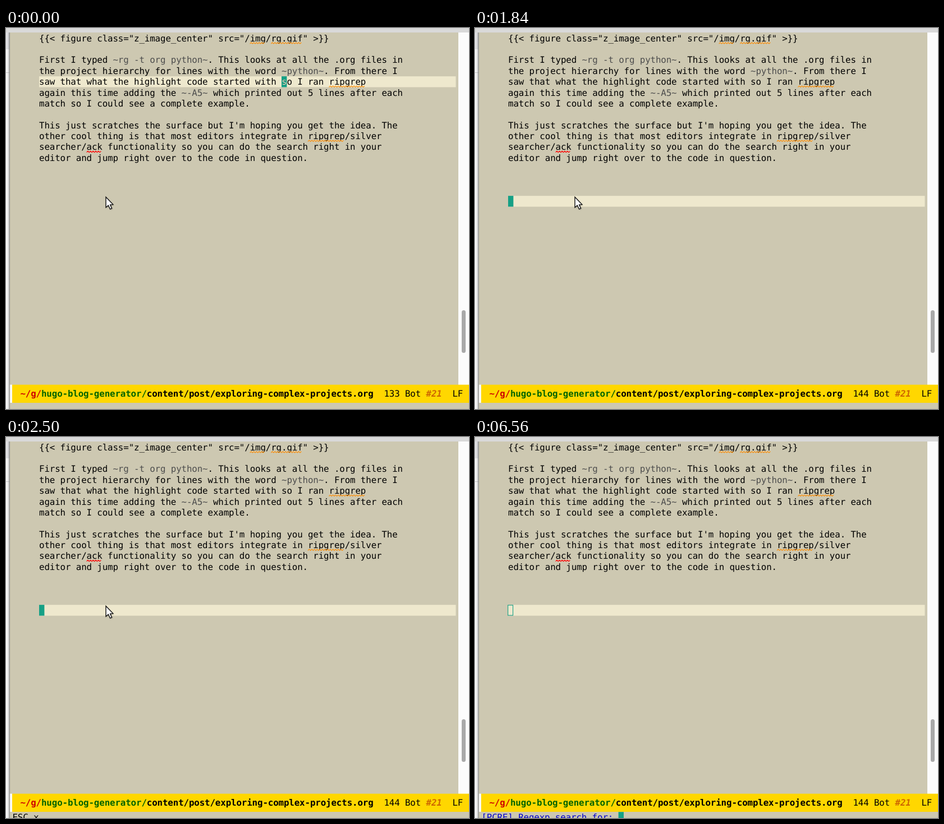
An HTML page with a canvas that plays this animation: 825x679 px, repeating every 8000 ms.

```html
<!DOCTYPE html>
<html lang="en">
<head>
<meta charset="utf-8">
<title>Editor search</title>
<style>
html, body { margin: 0; width: 100%; height: 100%; overflow: hidden; background: #cdc8b1; }
canvas { display: block; width: 825px; height: 679px; }
</style>
</head>
<body>
<canvas id="stage" width="825" height="679"></canvas>
<script>
const ctx = document.getElementById('stage').getContext('2d');
const LOOP = 8000;
const CELL = 9.391, ROW = 19.364, ASCENT = 15.1;
const LEFT = 59, TOP = 8.65;
const MODE_X = 25.4, MODE_BASE = 656.9;
const ECHO_X = 11.4, ECHO_TOP = 668.2;
const PAPER = '#cdc8b1', HIGHLIGHT = '#eee8cd', CURSOR = '#16a085';
const GRAY = '#4d4d4d', ORANGE = '#ff8c00', RED = '#ff0000';

// Text between tildes is verbatim markup and shown in gray.
const LINES = [
  '{{< figure class="z_image_center" src="/img/rg.gif" >}}',
  '',
  'First I typed ~rg -t org python~. This looks at all the .org files in',
  'the project hierarchy for lines with the word ~python~. From there I',
  'saw that what the highlight code started with so I ran ripgrep',
  'again this time adding the ~-A5~ which printed out 5 lines after each',
  'match so I could see a complete example.',
  '',
  "This just scratches the surface but I'm hoping you get the idea. The",
  'other cool thing is that most editors integrate in ripgrep/silver',
  'searcher/ack functionality so you can do the search right in your',
  'editor and jump right over to the code in question.'
];

const MISSPELLED = [
  [0, 'img', ORANGE], [0, 'rg.gif', ORANGE], [4, 'ripgrep', ORANGE],
  [9, 'ripgrep', ORANGE], [10, 'ack', RED]
];

const colX = col => LEFT + col * CELL;
const rowY = row => TOP + row * ROW;

function rect(x, y, w, h, color) {
  ctx.fillStyle = color;
  ctx.fillRect(x, y, w, h);
}

function print(text, x, baseline, color = '#000', style = '') {
  ctx.font = `${style} 15.8px "DejaVu Sans Mono", monospace`;
  ctx.fillStyle = color;
  [...text].forEach((ch, i) => {
    if (ch !== ' ') ctx.fillText(ch, x + i * CELL, baseline);
  });
}

function printLine(line, row) {
  let col = 0;
  for (const part of line.split(/(~[^~]+~)/)) {
    print(part, colX(col), rowY(row) + ASCENT, part[0] === '~' ? GRAY : '#000');
    col += part.length;
  }
}

function squiggle([row, word, color]) {
  const x0 = colX(LINES[row].indexOf(word));
  const x1 = x0 + word.length * CELL;
  const y = rowY(row) + ASCENT + 2;
  ctx.beginPath();
  for (let x = x0, i = 0; x <= x1; x += 2.35, i++) ctx.lineTo(x, y + (i % 2 ? 0 : 2.3));
  ctx.strokeStyle = color;
  ctx.lineWidth = 1.1;
  ctx.stroke();
}

function drawFrame() {
  rect(0, 0, 825, 679, PAPER);
  rect(0, 0, 7, 679, '#fbfbfb');
  rect(0, 8, 7, 30, '#e6e6e9');
  rect(0, 79, 7, 1, '#d0d0d0');
  const shade = ctx.createLinearGradient(2, 0, 7, 0);
  shade.addColorStop(0, 'rgba(90,90,90,0)');
  shade.addColorStop(1, 'rgba(90,90,90,0.5)');
  rect(2, 8, 5, 671, shade);
  rect(6, 8, 1, 671, '#8c8c88');
  rect(0, 0, 825, 8, '#d9d9d9');

  rect(806, 8, 19, 628, '#fcfcfc');
  ctx.fillStyle = '#a9a9a9';
  ctx.beginPath();
  ctx.roundRect(812, 503, 7, 76, 3.5);
  ctx.fill();
}

function drawCursor(row, col, hollow) {
  rect(LEFT, rowY(row), 801.5 - LEFT, ROW, HIGHLIGHT);
  if (hollow) {
    ctx.strokeStyle = CURSOR;
    ctx.lineWidth = 1.1;
    ctx.strokeRect(colX(col) - 0.3, rowY(row) + 0.6, CELL - 0.5, ROW - 1.2);
  } else {
    rect(colX(col), rowY(row), CELL, ROW, CURSOR);
  }
}

function drawModeLine(lineNumber, showSize) {
  rect(7, 635.7, 4, 32.3, '#fafafa');
  rect(11, 635.7, 814, 32.3, '#ffd700');
  let col = 0;
  const add = (text, color, style) => {
    print(text, MODE_X + col * CELL, MODE_BASE, color, style);
    col += text.length;
  };
  add('~/g/', '#cd0000', 'bold');
  add('hugo-blog-generator/', '#006400', 'bold');
  add('content/post/exploring-complex-projects.org', '#000', 'bold');
  add(`  ${lineNumber} Bot `);
  if (showSize) add('0C  ', '#000', 'bold');
  add('#21', '#cd6600', 'italic bold');
  if (!showSize) add('  LF');
}

function drawEcho(t) {
  const base = ECHO_TOP + ASCENT;
  if (t >= 4400) {
    const prompt = '[PCRE] Regexp search for: ';
    print(prompt, ECHO_X, base, '#0000cd');
    rect(ECHO_X + prompt.length * CELL, ECHO_TOP, CELL, ROW, CURSOR);
  } else if (t >= 2400) {
    print(t < 2500 ? 'ESC-' : 'ESC x', ECHO_X, base);
  }
}

function drawPointer() {
  ctx.save();
  ctx.translate(178, 301.2);
  ctx.beginPath();
  [[0, 0], [0, 18.6], [4.3, 14.9], [7.6, 21.6], [10.6, 20.2], [7.6, 13.8], [12.8, 13.4]]
    .forEach(([x, y]) => ctx.lineTo(x, y));
  ctx.closePath();
  ctx.shadowColor = 'rgba(0,0,0,0.35)';
  ctx.shadowBlur = 2;
  ctx.shadowOffsetX = ctx.shadowOffsetY = 1;
  ctx.fillStyle = '#fff';
  ctx.fill();
  ctx.shadowColor = 'transparent';
  ctx.strokeStyle = '#111';
  ctx.lineWidth = 1.4;
  ctx.stroke();
  ctx.restore();
}

function render(t) {
  const jumped = t >= 900, prompting = t >= 4400;
  drawFrame();
  drawCursor(jumped ? 15 : 4, jumped ? 0 : 46, prompting);
  LINES.forEach(printLine);
  if (!jumped) print('s', colX(46), rowY(4) + ASCENT, HIGHLIGHT);
  MISSPELLED.forEach(squiggle);
  drawModeLine(jumped ? 144 : 133, jumped && t < 1000);
  drawEcho(t);
  if (!prompting) drawPointer();
}

ctx.textRendering = 'geometricPrecision';
const start = performance.now();
function tick() {
  render((performance.now() - start) % LOOP);
  requestAnimationFrame(tick);
}
tick();
</script>
</body>
</html>
```
